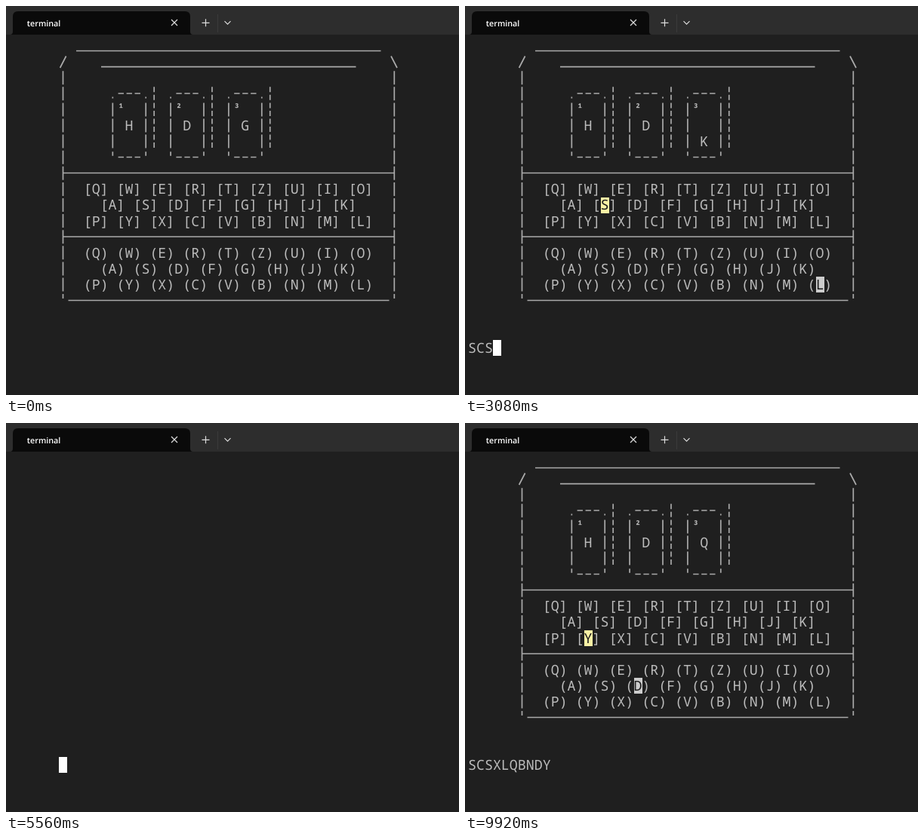
Recreate the animation shown at these times as an HTML page. Size 600 by 516 pixels, loop 10 s.

```html
<!DOCTYPE html>
<html lang="en">
<head>
<meta charset="utf-8">
<title>Terminal rotor machine</title>
<style>
html, body { margin: 0; width: 100%; height: 100%; overflow: hidden; background: #1f1f1f; }
svg { display: block; width: 600px; height: 516px; }
.mono { font: 18.283px "Noto Sans Mono", "DejaVu Sans Mono", monospace; fill: #bcbcbc;
  white-space: pre; text-rendering: geometricPrecision; font-variant-ligatures: none; }
.mark { font-size: 14px; font-weight: 700; }
.title { font: 600 10.8px "Open Sans", "Noto Sans", sans-serif; fill: #fff;
  text-rendering: geometricPrecision; }
.line { fill: none; stroke: #aaa; stroke-width: 1.7; }
.icon { fill: none; stroke: #dcdcdc; stroke-width: 1.2; }
</style>
</head>
<body>
<svg id="stage" viewBox="0 0 600 516" xmlns="http://www.w3.org/2000/svg">
  <rect width="600" height="516" fill="#1f1f1f"/>
  <rect width="600" height="38" fill="#2d2d2d"/>
  <path d="M5 38Q9 38 9 34V14Q9 7 16 7H237Q244 7 244 14V34Q244 38 248 38Z" fill="#0a0a0a"/>
  <text class="title" x="27.8" y="26.7">terminal</text>
  <path class="icon" d="M219 18L227 26M227 18L219 26"/>
  <path class="icon" d="M259.5 22.3H269.5M264.5 17.3V27.3"/>
  <path d="M280.5 11V35" stroke="#3a3a3a"/>
  <path class="icon" d="M289.5 20.2L293.5 24.2L297.5 20.2"/>
  <g id="machine"></g>
  <rect id="cursor" fill="#fff"/>
</svg>
<script>
const LOOP = 10000, CW = 10.97, RH = 21.1, LEFT = 4.2, TOP = 42;
const BOARD = ['QWERTZUIO', 'ASDFGHJK', 'PYXCVBNML'];
const KEYS = 'HELLOWORLD', LAMPS = 'SCSXLQBNDY';

// Per key press: clear, letter leaves, clear, next letter enters, clear, settled
const PRESSES = [
  [800, 880, 920, 1040, 1080, 1120],
  [1520, 1520, 1560, 1720, 1760, 1800],
  [2120, 2240, 2280, 2440, 2480, 2560],
  [2800, 2800, 2880, 3080, 3120, 3200],
  [3600, 3720, 3760, 3800, 3840, 3960],
  [4960, 5000, 5040, 5120, 5160, 5200],
  [5440, 5480, 5560, 5760, 5880, 5920],
  [6200, 6200, 6240, 6400, 6440, 6480],
  [6880, 7000, 7040, 7080, 7120, 7160],
  [7520, 7520, 7560, 7760, 7800, 7920]
];
const CURSOR_OFF = [[0, 560], [4600, 4960], [8600, 9640], [9920, LOOP]];

const machine = document.getElementById('machine');
const cursor = document.getElementById('cursor');
const colX = c => LEFT + c * CW;
const midX = c => colX(c + 0.5);
const rowY = r => TOP + r * RH;

function add(tag, attrs, text = '') {
  const el = document.createElementNS('http://www.w3.org/2000/svg', tag);
  for (const name in attrs) el.setAttribute(name, attrs[name]);
  el.textContent = text;
  return machine.appendChild(el);
}
function place(el, col, row) {
  el.setAttribute('x', colX(col) - 0.2);
  el.setAttribute('y', rowY(row) + 17.4);
}
function write(col, row, text) {
  const el = add('text', { class: 'mono' }, text);
  place(el, col, row);
  return el;
}
// Terminal cells sit on whole pixels
function cell(el, col, row) {
  el.setAttribute('x', Math.floor(colX(col) + 0.4));
  el.setAttribute('y', Math.round(rowY(row) + 0.5));
  el.setAttribute('width', 11);
  el.setAttribute('height', 21);
}

let d = '';
const seg = (x1, y1, x2, y2) => { d += `M${x1} ${y1}L${x2} ${y2}`; };
const bar = (c, r, from = 2, to = 20) => seg(midX(c), rowY(r) + from, midX(c), rowY(r) + to);

function drawCase() {
  seg(93, 59.5, 496.5, 59.5);
  seg(126, 80.6, 463.5, 80.6);
  seg(71.6, 82, 79.6, 66.5);
  seg(510, 66.5, 518, 82);
  seg(76, 221.5, 514.3, 221.5);
  seg(76, 306, 514.3, 306);
  seg(82.5, 390.5, 507.5, 390.5);
  for (const c of [6, 46]) {
    for (let r = 2; r < 16; r++) bar(c, r);
    bar(c, 16, 2.5, 8.5);
  }
}
function drawRotor(c, mark) {
  for (const side of [c, c + 4]) {
    bar(side, 3, 15.2, 17.2);
    for (let r = 4; r < 7; r++) bar(side, r);
    bar(side, 7, 3.5, 9);
  }
  for (let i = 1; i < 4; i++)
    for (const y of [116, 200.5]) seg(midX(c + i) - 3.7, y, midX(c + i) + 3.7, y);
  for (let r = 3; r < 7; r++) {
    bar(c + 5, r, 2, 9);
    bar(c + 5, r, 12.5, 19.5);
  }
  const label = add('text', { class: 'mono mark', x: colX(c + 1) + 1.2, y: rowY(4) + 14.3 }, mark);
}
function drawBoard(row, open, close) {
  BOARD.forEach((letters, i) =>
    write(i === 1 ? 11 : 9, row + i, [...letters].map(l => open + l + close).join(' ')));
}
function makeLight(color) {
  const box = add('rect', { fill: color });
  const text = write(0, 0, '');
  text.style.fill = '#1a1a1a';
  return (letter, row) => {
    box.style.display = text.style.display = letter ? '' : 'none';
    if (!letter) return;
    const i = BOARD.findIndex(line => line.includes(letter));
    const col = (i === 1 ? 12 : 10) + 4 * BOARD[i].indexOf(letter);
    cell(box, col, row + i);
    place(text, col, row + i);
    text.textContent = letter;
  };
}

drawCase();
['¹', '²', '³'].forEach((mark, i) => drawRotor(12 + 7 * i, mark));
add('path', { class: 'line', d });
drawBoard(9, '[', ']');
drawBoard(13, '(', ')');
write(14, 5, 'H');
write(21, 5, 'D');
const wheel = write(28, 5, 'G');
const output = write(0, 19, '');
const lamp = makeLight('#f9f1a5');
const key = makeLight('#cccccc');

function render(t) {
  const done = PRESSES.filter(p => p[5] <= t).length;
  const phase = done < PRESSES.length ? PRESSES[done].filter(x => x <= t).length : 0;
  const entering = phase === 4;
  machine.style.display = phase % 2 ? 'none' : '';

  wheel.textContent = String.fromCharCode(71 + done + (entering ? 1 : 0));
  place(wheel, 28, phase === 2 ? 4 : entering ? 6 : 5);
  output.textContent = LAMPS.slice(0, done);
  lamp(LAMPS[done - 1], 9);
  key(KEYS[done - 1], 13);

  const home = phase === 5 && (done === 3 || done === 6);
  if (home) cell(cursor, 0, 0);
  else cell(cursor, done, done ? 19 : 18);
  cursor.style.display = CURSOR_OFF.some(([a, b]) => t >= a && t < b) ? 'none' : '';
}

const start = performance.now();
function tick() {
  render((performance.now() - start) % LOOP);
  requestAnimationFrame(tick);
}
tick();
</script>
</body>
</html>
```
